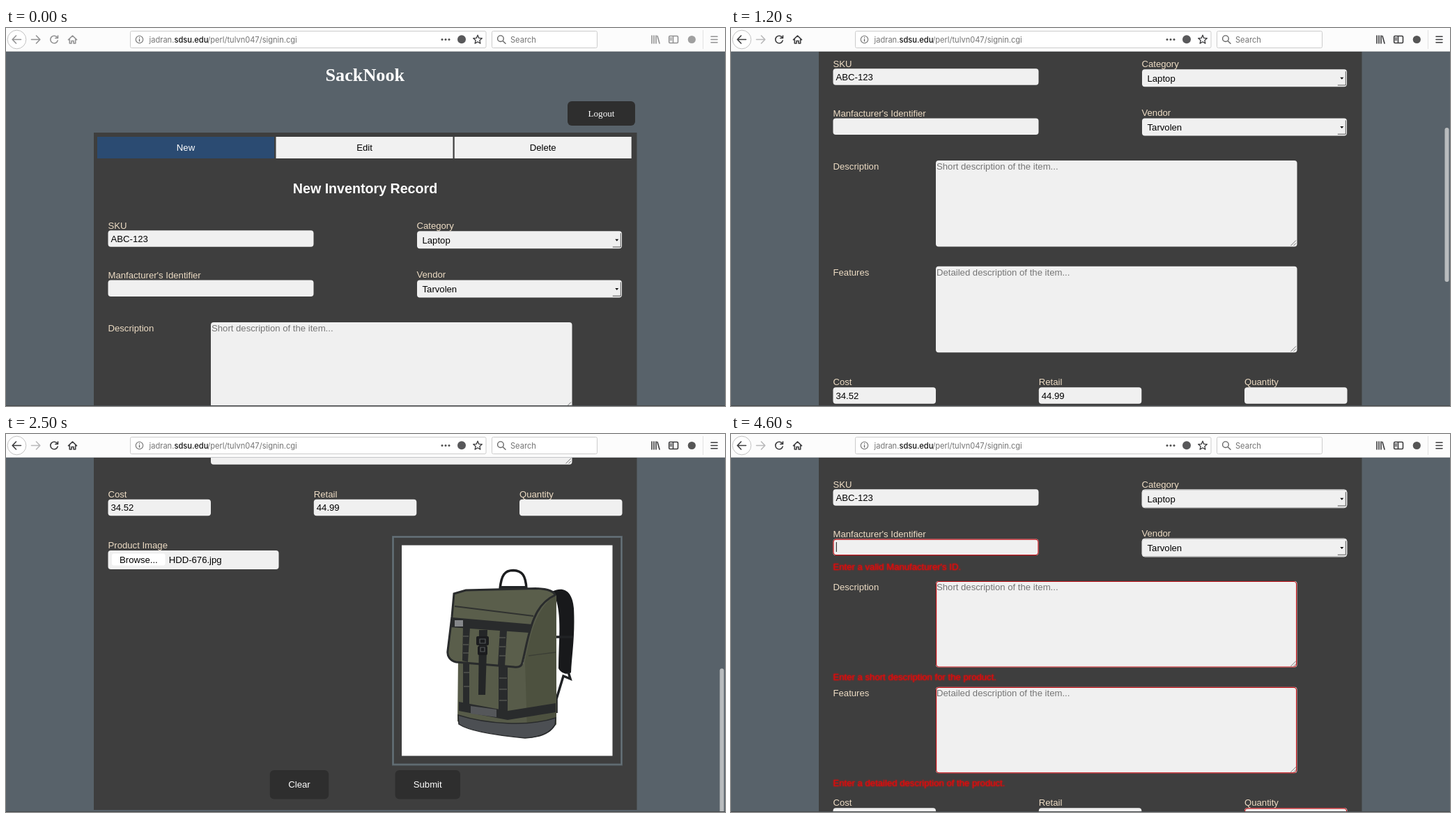
Animation of 1032x542 px, one loop 4.7 s. Source, as an HTML page:

```html
<!DOCTYPE html>
<html lang="en">
<head>
<meta charset="utf-8">
<title>Inventory form</title>
<style>
html, body { margin: 0; width: 100%; height: 100%; overflow: hidden; background: #58626a; }
svg { display: block; width: 1032px; height: 542px; }
text { font: 13.15px "Liberation Sans", Arial, sans-serif; white-space: pre; }
.label { fill: #eddcc4; }
.hint { fill: #757575; }
.white { fill: #fff; }
.mid { text-anchor: middle; }
.title { font: bold 26.2px "Liberation Serif", Times, serif; }
.serif { font-family: "Liberation Serif", Times, serif; }
.heading { font-weight: bold; font-size: 19.65px; }
.error { fill: #dc0c0c; filter: drop-shadow(0 0 1px #f00); }
.ui { font: 11.1px Inter, sans-serif; fill: #737373; }
.host { font-weight: 500; fill: #111; }
.line { fill: none; stroke: #3c3c3e; stroke-width: 1.6; stroke-linecap: round; stroke-linejoin: round; }
</style>
</head>
<body>
<svg id="stage" viewBox="0 0 1032 542"></svg>
<script>
const LOOP = 4700, STEP = 100;
const ACTIVATE = 300, SUBMIT = 3300, BLINK = 567;

// Scroll offset over time, eased between stops: [ms, px]
const scrollStops = [
  [700, 0], [900, 50], [1000, 130], [1100, 206], [1200, 232], [1400, 250], [1500, 272],
  [1600, 328.5], [1700, 436], [1800, 544], [1900, 608], [2000, 638], [2200, 653.5]
];

const text = (x, y, str, cls = '') => `<text x="${x}" y="${y}" class="${cls}">${str}</text>`;
const rect = (x, y, w, h, fill, r = 0, extra = '') =>
  `<rect x="${x}" y="${y}" width="${w}" height="${h}" rx="${r}" fill="${fill}" ${extra}/>`;
const path = (d, fill, stroke = 'none', width = 1) =>
  `<path d="${d}" fill="${fill}" stroke="${stroke}" stroke-width="${width}"/>`;
const line = (d, extra = '') => `<path class="line" d="${d}" ${extra}/>`;
const field = (x, y, w, h = 23.5) => rect(x, y, w, h, '#f0f0f0', 4);
const button = (x, y, w, h, label, cls = '') =>
  rect(x, y, w, h, '#2e2e2e', 6) + text(x + w / 2, y + h / 2 + 4.4, label, `white mid ${cls}`);

function tab(x, label, active) {
  return rect(x, 156, 254, 31, active ? '#2b4b72' : '#f1f1f1') +
    text(x + 127, 175.7, label, active ? 'white mid' : 'mid');
}

function input(x, y, w, label, value = '') {
  return text(x, y - 2.8, label, 'label') + field(x, y, w) + text(x + 4, y + 16.7, value);
}

function select(y, label, value) {
  return text(589.5, y - 3.2, label, 'label') + field(590, y, 294, 25) +
    text(597.5, y + 17.3, value) +
    path(`M874.3 ${y + 11.5}h5l-2.5 3z`, '#111') +
    path(`M882.3 ${y + 3}v19.8h-11.5`, 'none', '#555');
}

function textarea(y, label, hint) {
  return text(146.5, y + 12.7, label, 'label') + field(294, y, 518.5, 123.5) +
    text(295, y + 13.4, hint, 'hint') +
    path(`M803.5 ${y + 122}l7.5 -7.5M807.5 ${y + 122}l3.5 -3.5`, 'none', '#777');
}

function backpack() {
  const olive = '#575b49', dark = '#292b2c';
  return path('M782 227C800 217 813 225 815 250C817 290 812 318 811 342C806 346 796 343 793 336C793 300 798 262 789 236Z', '#18191b') +
    path('M788 291H814M807 341L810 351L800 347L790 380V400', 'none', '#202224', 3.5) +
    path('M709 222C711 202 716 195.500 728 195.500C741 196 746 203 747 222', 'none', '#1c1d1f', 3.5) +
    path('M710 218H748V224H708Z', '#222426') +
    path('M649 322L648 412C670 426 720 434 757 433L780 427L790 416V231L760 240L742 330Z', olive) +
    path('M789 231C760 250 752 290 745 326L748 425L780 424L790 416Z', '#4d513f') +
    path('M750 318L789 313', 'none', '#3b3e35', 1.3) +
    path('M656 325H665V392L656 390ZM707 330H720V405L707 402Z', dark) +
    path('M643 229L660 224L760 221.500C778 222 787 226 788 231C775 237 766 247 760 260C750 280 747 305 741 328C740 333 736 335 729 334L646 327C637 325 633 318 634 311L640 262Z', '#5a5e4b', dark, 3) +
    path('M644 247L757 261', 'none', '#303230', 2) +
    path('M640 263L756 273L751 285L638 277Z', dark) +
    path('M656 277H666L663 327L655 325ZM709 281H719L716 333L706 332Z', dark) +
    path('M656 290h8M656 302h8M656 314h8M708 292h9M708 305h9M708 318h9M657 342h8M657 362h8M708 350h11M708 366h11M708 382h11', 'none', '#666960', 1) +
    path('M679 281H691L688 374H678Z', '#242627') +
    rect(675, 290, 18, 13, '#1b1c1e', 2) + rect(677, 304, 14, 13, '#1b1c1e', 2) +
    path('M680 294h8v6h-8zM681 306h6v6h-6z', 'none', '#55585a', 1.2) +
    rect(644, 267, 12, 9, '#85878a') +
    path('M650 384L720 397L789 386V399L720 410L650 397Z', dark) +
    path('M667 390L704 395V406L667 401Z', '#55575a') +
    path('M649 403C690 416 750 420 789 407L788 417C781 429 768 435 745 436C702 432 663 425 650 416Z', '#4c4f53', dark, 1.5);
}

const errorBox = (x, y, w, h) => rect(x, y, w, h, 'none', 4, 'stroke="#c01218" stroke-width="1.2"');

function page() {
  return rect(126, 150, 779.5, 1042.5, '#3e3e3e') +
    text(515.3, 75.5, 'SackNook', 'white mid title') +
    button(806, 105, 97, 35, 'Logout', 'serif') +
    tab(131, 'New', true) + tab(387.5, 'Edit') + tab(643.7, 'Delete') +
    text(515.5, 237.4, 'New Inventory Record', 'white mid heading') +
    input(146.5, 290.3, 295, 'SKU', 'ABC-123') +
    input(146.5, 361.6, 295, "Manfacturer's Identifier") +
    select(291.2, 'Category', 'Laptop') +
    select(361.4, 'Vendor', 'Tarvolen') +
    textarea(422, 'Description', 'Short description of the item...') +
    textarea(573.8, 'Features', 'Detailed description of the item...') +
    input(146.5, 747.2, 147.5, 'Cost', '34.52') +
    input(441.8, 747.2, 147.5, 'Retail', '44.99') +
    input(737, 747.2, 147.5, 'Quantity') +
    text(146.5, 817.9, 'Product Image', 'label') + field(146.5, 820.6, 245, 27) +
    rect(152, 825, 76.5, 17, '#fff', 3) + text(163, 838.4, 'Browse...') +
    text(233.7, 838.4, 'HDD-676.jpg', 'file') +
    rect(555.5, 801, 328, 326.5, 'none', 0, 'stroke="#556067" stroke-width="3"') +
    rect(555.5, 801, 328, 326.5, 'none', 0, 'stroke="#707b81" stroke-width=".8"') +
    rect(568, 813, 302.5, 302, '#fff') +
    `<g transform="translate(0 653.5)">${backpack()}</g>` +
    button(378.7, 1135.6, 84.5, 41.5, 'Clear') + button(558.5, 1135.6, 93.5, 41.5, 'Submit') +
    `<g id="errors">
      ${text(146.5, 406.2, "Enter a valid Manufacturer's ID.", 'error')}
      ${text(146.5, 564.4, 'Enter a short description for the product.', 'error')}
      ${text(146.5, 715.8, 'Enter a detailed description of the product.', 'error')}
      ${errorBox(147, 362.1, 294, 22.5) + errorBox(294.6, 422.5, 517, 122.5)}
      ${errorBox(294.6, 574.3, 517, 122.5) + errorBox(737.6, 747.8, 146, 22.5)}
      ${[291.2, 361.4].map(y => rect(590, y - .4, 294, 26, 'none', 4, 'stroke="#e4e4e4"')).join('')}
      ${rect(150.8, 366, 1, 14, '#111', 0, 'id="caret"')}
    </g>`;
}

function toolbar() {
  const star = Array.from({ length: 10 }, (_, i) => {
    const a = i * Math.PI / 5 - Math.PI / 2, r = i % 2 ? 3 : 6.6;
    return `${677 + r * Math.cos(a)} ${16.8 + r * Math.sin(a)}`;
  }).join('L');
  const box = (x, w) => rect(x, 4.5, w, 24, '#fff', 2, 'stroke="#ccc"');
  return rect(0, 0, 1032, 33.5, '#fcfcfc') + rect(0, 33, 1032, 1, '#c4c6c8') +
    `<circle cx="15.5" cy="16.5" r="13.3" fill="#fff" stroke="#c2c2c2"/>` +
    `<g id="icons">
      ${line('M21.500 16.500H9.500M14.500 11L9.200 16.500L14.500 22')}
      ${line('M73.500 13.500A5.300 5.300 0 1 0 74.200 18M74.500 11V14.500H70.800')}
      ${line('M89.500 16.800L95.500 11L101.500 16.800M91.300 16.500V22H94V18.500H97V22H99.700V16.500')}
      ${line('M927 11V22M930 11V22M933 11V22M935 11.500L938 22', 'stroke-width="1.4"')}
      ${line('M953 11.500H963Q964.500 11.500 964.500 13V20Q964.500 21.500 963 21.500H953Q951.700 21.500 951.700 20V13Q951.700 11.500 953 11.500ZM957.500 12V21M953.500 14.500h2M953.500 17h2')}
      <circle cx="984.3" cy="16.5" r="5.6" fill="#555"/>
      ${line('M1012 12.300H1021M1012 16.500H1021M1012 20.700H1021')}
    </g>` +
    line('M36.500 16.500H48.500M43.500 11L48.800 16.500L43.500 22', 'id="forward"') +
    rect(1000, 3, 1, 27, '#e2e2e2') +
    box(178.5, 510.5) + box(697.5, 151) +
    '<circle cx="191.5" cy="16.5" r="5.2" fill="none" stroke="#707070" stroke-width="1.1"/>' +
    path('M191.500 13.300v1.300M191.500 15.800v3.700', 'none', '#606060', 1.3) +
    text(205.5, 20.6, 'jadran.', 'ui') + text(241.5, 20.6, 'sdsu.edu', 'ui host') +
    text(289.2, 20.6, '/perl/tulvn047/signin.cgi', 'ui') +
    [626, 631, 636].map(x => `<circle cx="${x}" cy="16.5" r="1.5" fill="#505050"/>`).join('') +
    '<circle cx="654" cy="16.3" r="6" fill="#58585a"/>' +
    line(`M${star}Z`, 'style="stroke-width:1.3"') +
    line('M713 18.500L717 22.300M714.200 15.200A4.300 4.300 0 1 1 705.600 15.200A4.300 4.300 0 1 1 714.200 15.200', 'style="stroke:#666;stroke-width:1.4"') +
    text(724, 20.6, 'Search', 'ui');
}

const byId = id => document.getElementById(id);
byId('stage').innerHTML = rect(0, 0, 1032, 542, '#58626a') +
  `<g id="page">${page()}</g>` +
  rect(1024.5, 0, 6, 221, '#b9bcbe', 3, 'id="thumb"') +
  rect(0, 541, 1032, 1, '#45494c') + toolbar();

function scrollAt(t) {
  if (t >= SUBMIT) return 211;
  const i = scrollStops.findIndex(([time]) => time > t);
  if (i < 0) return scrollStops.at(-1)[1];
  if (i === 0) return 0;
  const [t0, y0] = scrollStops[i - 1], [t1, y1] = scrollStops[i];
  return y0 + (y1 - y0) * (t - t0) / (t1 - t0);
}

function draw() {
  const t = Math.floor(performance.now() % LOOP / STEP) * STEP;
  const scroll = scrollAt(t), active = t >= ACTIVATE;
  byId('page').setAttribute('transform', `translate(0 ${-scroll})`);
  byId('thumb').setAttribute('y', 36.5 + scroll * 0.4586);
  byId('thumb').style.opacity = t <= 700 ? 0 : Math.max(0, Math.min(1, (4400 - t) / 300));
  byId('icons').style.opacity = active ? 1 : 0.55;
  byId('forward').style.opacity = active ? 0.35 : 0.55;
  byId('errors').style.display = t >= SUBMIT ? '' : 'none';
  byId('caret').style.display = Math.floor((t - SUBMIT) / BLINK) % 2 ? 'none' : '';
  requestAnimationFrame(draw);
}
draw();
</script>
</body>
</html>
```
